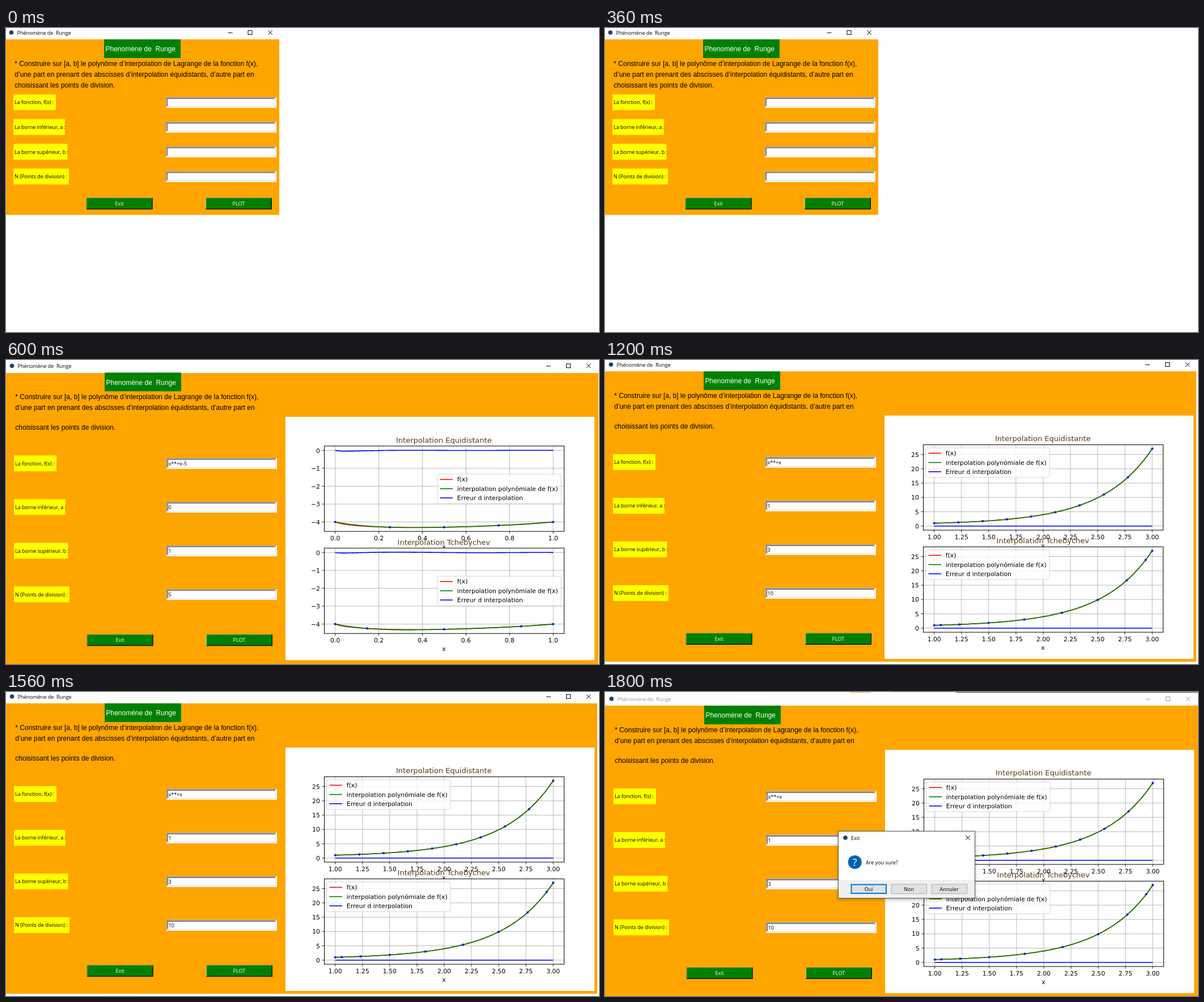
Write an HTML page with a canvas that moves like this. It is 1046 by 536 pixels and loops after 2.4 s.

```html
<!DOCTYPE html>
<html lang="fr">
<head>
<meta charset="utf-8">
<title>Phénomène de Runge</title>
<style>
  html, body { margin: 0; width: 100%; height: 100%; overflow: hidden; background: #fff; }
  canvas { display: block; }
</style>
</head>
<body>
<canvas id="stage" width="1046" height="536"></canvas>
<script>
const ctx = document.getElementById('stage').getContext('2d');
const UI = '9px "Open Sans", sans-serif';
const ARIAL = '12px "Liberation Sans", Arial, sans-serif';
const PLOT = '10.83px "DejaVu Sans", sans-serif';
const PLOT_TITLE = '13px "DejaVu Sans", sans-serif';
const STEP = 600;

const small = {
  a: 0, b: 1, n: 5, xStep: 0.2, digits: 1, yTicks: [0, -1, -2, -3, -4],
  zero: 7.7, unit: 31.55, legend: [761, 49.5], f: x => x ** x - 5
};
const large = {
  a: 1, b: 3, n: 10, xStep: 0.25, digits: 2, yTicks: [0, 5, 10, 15, 20, 25],
  zero: 143.3, unit: 5.05, legend: [566, 5.5], f: x => x ** x
};

const wide = { rowTop: 166, rowGap: 77, lastLine: 121, buttonY: 481.5, controls: 0 };
const scenes = [
  { dx: -1, dy: 0, right: 482, bottom: 329.5, rowTop: 117, rowGap: 43.6,
    lastLine: 104.5, buttonY: 299.3, controls: -560.5, values: [] },
  { ...wide, dx: 0, dy: 2.2, right: 1045, bottom: 536, values: ['x**+x-5', 0, 1, 5], data: small },
  { ...wide, dx: 0, dy: 0, right: 1043, bottom: 532, values: ['x**+x', 1, 3, 10], data: large },
  { ...wide, dx: 1, dy: 4, right: 1046, bottom: 536, values: ['x**+x', 1, 3, 10], data: large, dialog: true }
];
const fields = [
  ['La fonction, f(x) :', 75], ['La borne inférieur, a :', 91],
  ['La borne supérieur, b :', 95.5], ['N (Points de division) :', 98]
];

function rect(x, y, w, h, color) {
  ctx.fillStyle = color;
  ctx.fillRect(x, y, w, h);
}
function text(str, x, y, font, color = '#000', align = 'left') {
  ctx.font = font;
  ctx.fillStyle = color;
  ctx.textAlign = align;
  ctx.fillText(str, x, y);
}
function line(points, color, width) {
  ctx.beginPath();
  points.forEach(([x, y]) => ctx.lineTo(x, y));
  ctx.strokeStyle = color;
  ctx.lineWidth = width;
  ctx.stroke();
}
function dot(x, y, r, color) {
  ctx.beginPath();
  ctx.arc(x, y, r, 0, 2 * Math.PI);
  ctx.fillStyle = color;
  ctx.fill();
}
function cross(x, y, color) {
  line([[x - 3.8, y - 3.8], [x + 3.8, y + 3.8]], color, 1);
  line([[x - 3.8, y + 3.8], [x + 3.8, y - 3.8]], color, 1);
}
function bevel(x, y, w, h, t, topLeft, bottomRight) {
  rect(x, y, w, h, bottomRight);
  rect(x, y, w - t, t, topLeft);
  rect(x, y, t, h - t, topLeft);
}

function titleBar(s) {
  const color = s.dialog ? '#999' : '#000';
  dot(10.5, 8, 3.8, '#20406a');
  text('Phénomène de  Runge', 20.5, 11.8, UI, color);
  const x = s.controls;
  line([[x + 953, 8.5], [x + 961, 8.5]], color, 1);
  ctx.strokeRect(x + 988.5, 4.5, 7, 7);
  cross(x + 1027.7, 8, color);
}

function button(label, x, y) {
  bevel(x, y, 117, 20.5, 1, '#a5d0a0', '#001800');
  rect(x + 1, y + 1, 114.5, 18, '#008000');
  text(label, x + 58.3, y + 13.4, UI, '#fff', 'center');
}

function form(s) {
  rect(174, 20, 135, 33, '#008000');
  text('Phenomène de  Runge', 176.5, 41.3, ARIAL, '#fff');
  text('* Construire sur [a, b] le polynôme d’interpolation de Lagrange de la fonction f(x),', 16.3, 67, ARIAL);
  text('d’une part en prenant des abscisses d’interpolation équidistants, d’autre part en', 16.3, 86, ARIAL);
  text('choisissant les points de division.', 16.3, s.lastLine, ARIAL);
  fields.forEach(([label, w], i) => {
    const y = s.rowTop + i * s.rowGap;
    rect(14, y, w, 28, '#ff0');
    text(label, 16, y + 17.3, UI);
    bevel(283, y + 4.8, 195, 19, 1.6, '#a0a0a0', '#fff');
    bevel(284.6, y + 6.4, 191.8, 15.8, 1.6, '#696969', '#e3e3e3');
    rect(286.2, y + 8, 188.8, 12.8, '#fff');
    text(s.values[i] ?? '', 286.5, y + 17.8, UI);
  });
  button('Exit', 142.7, s.buttonY);
  button('PLOT', 353, s.buttonY);
}

// Lagrange polynomial through f at the given nodes
function interpolate(f, nodes) {
  return x => nodes.reduce((sum, xi) =>
    sum + nodes.reduce((p, xj) => xj === xi ? p : p * (x - xj) / (xi - xj), f(xi)), 0);
}

function axes(d, top, title, spacing) {
  const left = 561.5, right = 984.5, height = 150.5, bottom = top + height;
  const { a, b, n, f } = d;
  const px = x => 580.7 + (x - a) / (b - a) * 384.5;
  const py = y => top + d.zero - y * d.unit;
  const nodes = Array.from({ length: n }, (_, k) => a + (b - a) * spacing(k / (n - 1)));
  const poly = interpolate(f, nodes);
  const curve = (g, color) =>
    line(Array.from({ length: 101 }, (_, i) => a + (b - a) * i / 100).map(x => [px(x), py(g(x))]), color, 1.6);

  rect(left, top, right - left, height, '#fff');
  for (let x = a; x < b + 0.01; x += d.xStep) {
    line([[px(x), top], [px(x), bottom]], '#b0b0b0', 0.87);
    line([[px(x), bottom], [px(x), bottom + 3.8]], '#000', 0.87);
    text(x.toFixed(d.digits), px(x), bottom + 15.7, PLOT, '#000', 'center');
  }
  for (const y of d.yTicks) {
    line([[left, py(y)], [right, py(y)]], '#b0b0b0', 0.87);
    line([[left - 3.8, py(y)], [left, py(y)]], '#000', 0.87);
    text(String(y).replace('-', '−'), left - 7.6, py(y) + 4.1, PLOT, '#000', 'right');
  }
  text('x', 772.5, bottom + 31, PLOT, '#000', 'center');

  curve(f, 'red');
  curve(poly, 'green');
  curve(x => f(x) - poly(x), 'blue');
  nodes.forEach(x => dot(px(x), py(f(x)), 2.1, '#1020d8'));
  ctx.strokeStyle = '#000';
  ctx.lineWidth = 1;
  ctx.strokeRect(left, top, right - left, height);
  text(title, 772.3, top - 6.2, PLOT_TITLE, '#553c08', 'center');

  const lx = d.legend[0], ly = top + d.legend[1];
  ctx.beginPath();
  ctx.roundRect(lx, ly, 218, 52, 2.2);
  ctx.fillStyle = 'rgba(255,255,255,.8)';
  ctx.fill();
  ctx.strokeStyle = 'rgba(204,204,204,.8)';
  ctx.stroke();
  [['f(x)', 'red'], ['interpolation polynômiale de f(x)', 'green'], ['Erreur d interpolation', 'blue']]
    .forEach(([label, color], i) => {
      const y = ly + 9.4 + i * 16.3;
      line([[lx + 4.5, y], [lx + 27, y]], color, 1.6);
      text(label, lx + 34.8, y + 3.8, PLOT);
    });
}

function figure(d) {
  rect(493, 98, 545, 429, '#fff');
  axes(d, 149.5, 'Interpolation Equidistante', t => t);
  axes(d, 329.5, 'Interpolation Tchebychev', t => (1 - Math.cos(Math.PI * t)) / 2);
}

function dialog() {
  ctx.save();
  ctx.shadowColor = 'rgba(0,0,0,.3)';
  ctx.shadowBlur = 6;
  ctx.shadowOffsetY = 2;
  rect(411, 245, 242, 119, '#555');
  ctx.restore();
  rect(412, 246, 240, 117, '#fff');
  rect(412, 331, 240, 32, '#f0f0f0');
  dot(424, 257, 3.8, '#20406a');
  text('Exit', 434, 260.8, UI);
  cross(640, 257, '#000');
  dot(440.7, 300, 12, '#0063b1');
  text('?', 440.7, 306.5, '18px "Open Sans", sans-serif', '#fff', 'center');
  text('Are you sure?', 460, 303.8, UI);
  ['Oui', 'Non', 'Annuler'].forEach((label, i) => {
    const x = 433.5 + i * 71, w = i ? 1 : 2;
    rect(x, 338.5, 63.5, 17.5, i ? '#adadad' : '#0078d7');
    rect(x + w, 338.5 + w, 63.5 - 2 * w, 17.5 - 2 * w, '#e1e1e1');
    text(label, x + 31.7, 350.8, UI, '#000', 'center');
  });
}

function draw(s) {
  const top = Math.round(20.3 + s.dy);
  rect(0, 0, 1046, 536, '#fff');
  rect(0, top, s.right, s.bottom - top, '#ffa500');
  ctx.save();
  ctx.translate(s.dx, s.dy);
  titleBar(s);
  form(s);
  if (s.data) figure(s.data);
  ctx.restore();
  if (s.dialog) {
    rect(432, 0, 37, 1, '#f0a030');
    rect(505, 0, 114, 1, '#e8e8e8');
    rect(619, 0, 427, 1, '#444');
    dialog();
  }
}

function tick() {
  draw(scenes[Math.floor(performance.now() / STEP) % scenes.length]);
  requestAnimationFrame(tick);
}
tick();
</script>
</body>
</html>
```
